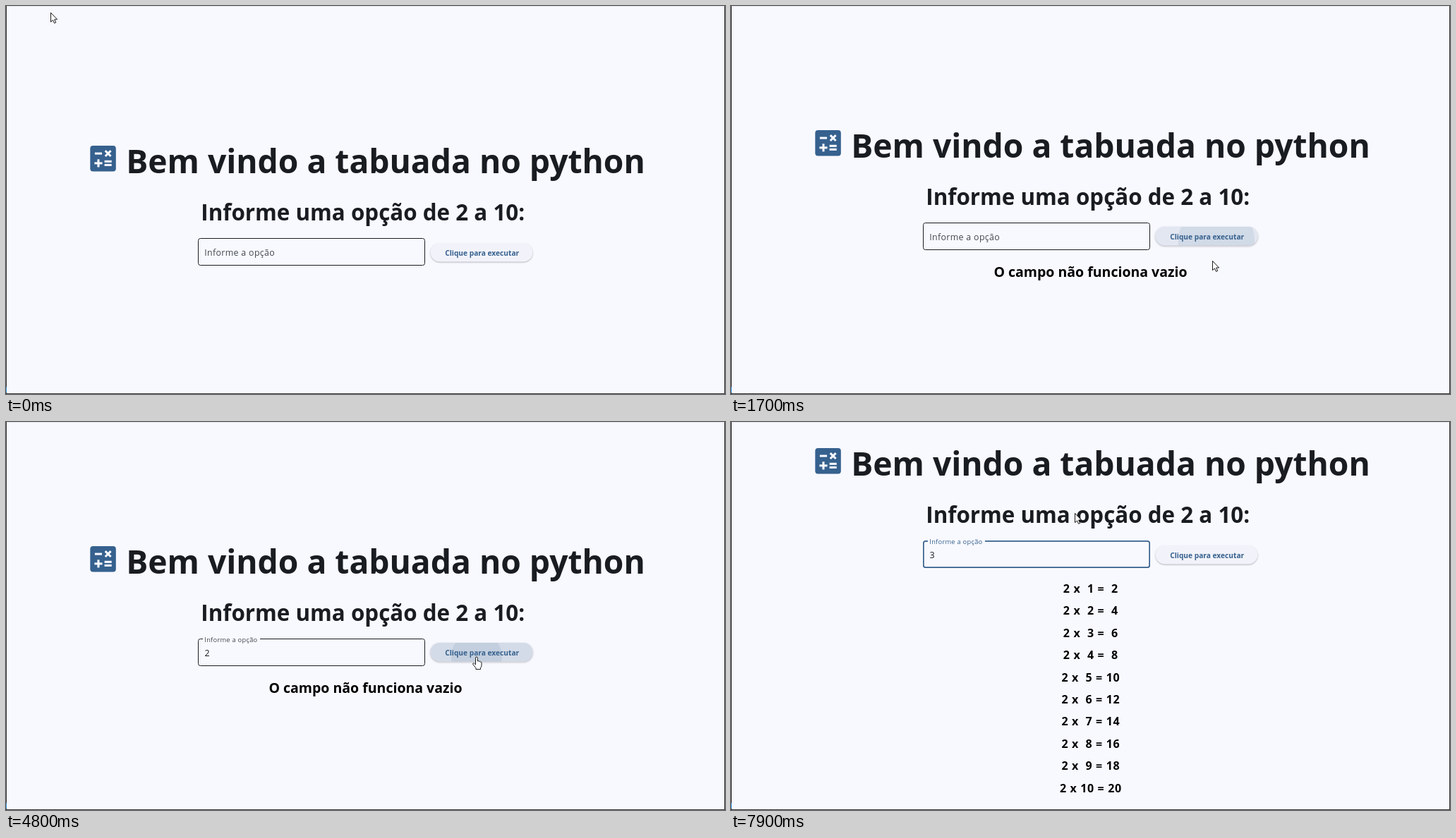
Animation of 1019x550 px, one loop 8000 ms. Source, as an HTML page with a canvas:

```html
<!DOCTYPE html>
<html lang="pt">
<head>
<meta charset="utf-8">
<title>Tabuada</title>
<style>
  html, body { margin: 0; width: 100%; height: 100%; overflow: hidden; background: #f8f9ff; }
  canvas { display: block; width: 1019px; height: 550px; }
</style>
</head>
<body>
<canvas id="stage" width="1019" height="550"></canvas>
<script>
const ctx = document.getElementById('stage').getContext('2d');
const LOOP = 8000, STEP = 100, BLINK = 500;
const BG = '#f8f9ff', INK = '#191c20', MUTED = '#42474e', PRIMARY = '#36618e', EDGE = '#33353c';
const FONT = '"Open Sans", "Noto Sans", sans-serif';
const FIELD = { x: 272, y: 306.5, w: 322, h: 39 };
const BUTTON = { x: 601.5, y: 313, w: 145, h: 26.5 };

// What the visitor does
const PRESSES = [
  { down: 1700, up: 1700, x: 688, y: 333, reach: 54 },
  { down: 4800, up: 5000, x: 667, y: 333, reach: 36 }
];
const HOVERS = [[1500, 2000], [4500, 5000]];
const FOCUSES = [[2700, 4700], [6100, LOOP]];
const EDITS = [[3500, '2'], [6900, ''], [7300, '3']];
const GLIDES = [ // start, end, x, y
  [0, 400, 511, 440], [500, 1100, 735, 345], [1400, 1500, 688, 356],
  [1600, 1700, 682, 361], [2000, 2600, 540, 330], [4400, 4700, 667, 333],
  [5000, 5600, 398, 300], [5700, 5900, 395, 190], [7700, 7900, 487, 129]
];

const clamp = v => Math.max(0, Math.min(1, v));
const mix = (a, b, p) => a + (b - a) * p;
const within = (spans, t) => spans.find(([a, b]) => t >= a && t < b);
const inside = (box, x, y, Y) =>
  x >= box.x && x <= box.x + box.w && y >= Y(box.y) && y <= Y(box.y) + box.h;

function pointerAt(t) {
  let x = 63, y = 9;
  for (const [start, end, toX, toY] of GLIDES) {
    const p = clamp((t - start) / (end - start));
    x = mix(x, toX, p);
    y = mix(y, toY, p);
  }
  return [Math.round(x), Math.round(y)];
}

function text(str, x, y, size, { weight = 700, color = INK, align = 'center', gap = 0 } = {}) {
  ctx.font = `${weight} ${size}px ${FONT}`;
  ctx.letterSpacing = gap + 'px';
  ctx.textAlign = align;
  ctx.fillStyle = color;
  ctx.fillText(str, x, y);
}

function rect(x, y, w, h, color) {
  ctx.fillStyle = color;
  ctx.fillRect(x, y, w, h);
}

function roundRect(x, y, w, h, r) {
  ctx.beginPath();
  ctx.roundRect(x, y, w, h, r);
}

function drawIcon(y) {
  const s = 36.5 / 18;
  ctx.save();
  ctx.translate(119.3, y);
  ctx.scale(s, s);
  ctx.translate(-3, -3);
  ctx.fillStyle = PRIMARY;
  roundRect(3, 3, 18, 18, 2);
  ctx.fill();
  rect(6.25, 7.72, 5, 1.5, BG);
  rect(13, 13.25, 5, 1.5, BG);
  rect(13, 15.75, 5, 1.5, BG);
  rect(6, 14.5, 5.5, 1.5, BG);
  rect(8, 12.5, 1.5, 5.5, BG);
  ctx.strokeStyle = BG;
  ctx.lineWidth = 1.5;
  ctx.beginPath();
  for (const d of [-1.94, 1.94]) {
    ctx.moveTo(15.5 - d, 6.53);
    ctx.lineTo(15.5 + d, 10.41);
  }
  ctx.stroke();
  ctx.restore();
}

function drawField(t, Y) {
  const focus = within(FOCUSES, t);
  const edit = EDITS.filter(e => e[0] <= t).pop() || [0, ''];
  const value = edit[1];
  const rise = 1 - (1 - clamp((t - 2600) / 300)) ** 2;
  const line = focus ? 1.7 : 1;
  const top = Y(FIELD.y);

  ctx.strokeStyle = focus ? PRIMARY : INK;
  ctx.lineWidth = line;
  roundRect(FIELD.x + line / 2, top + line / 2, FIELD.w - line, FIELD.h - line, 3);
  ctx.stroke();
  if (rise > 0) rect(279, top - 1, 81 * rise, 4, BG);

  text('Informe a opção', 281.3, Math.round(mix(Y(331.5), Y(311.5), rise)), mix(12.4, 9.3, rise),
    { weight: 400, color: focus ? PRIMARY : MUTED, align: 'left', gap: mix(0.32, 0.26, rise) });
  text(value, 281.5, Y(331.5), 12.4, { weight: 400, align: 'left' });

  // The caret starts lit again at every focus and edit
  if (focus) {
    const age = t - Math.max(focus[0], edit[0]);
    if (age % (2 * BLINK) < BLINK) rect(value ? 289.2 : 282, Y(316), 1.5, 20, PRIMARY);
  }
}

function drawButton(t, Y) {
  const { x, w, h } = BUTTON, y = Y(BUTTON.y);
  const hover = Math.max(...HOVERS.map(([a, b]) => t < a ? 0 : clamp(1 - (t - b) / 300)));
  const pressed = PRESSES.some(p => t >= p.down && t < p.up);
  const tint = 0.08 * hover + (pressed ? 0.085 : 0);

  ctx.save();
  ctx.shadowColor = 'rgba(0,0,0,0.28)';
  ctx.shadowBlur = 2 + hover;
  ctx.shadowOffsetY = 1;
  ctx.fillStyle = '#f2f3fa';
  roundRect(x, y, w, h, h / 2);
  ctx.fill();
  ctx.restore();

  ctx.save();
  roundRect(x, y, w, h, h / 2);
  ctx.clip();
  rect(x, y, w, h, `rgba(54,97,142,${tint})`);
  for (const p of PRESSES) {
    if (t < p.down) continue;
    const age = Math.max(0, t - p.up);
    ctx.fillStyle = `rgba(54,97,142,${0.1 * clamp(1 - age / 200)})`;
    ctx.beginPath();
    ctx.arc(p.x, Y(p.y), p.reach + age / 4, 0, Math.PI * 2);
    ctx.fill();
  }
  ctx.restore();
  text('Clique para executar', 674.7, Y(331), 10.2, { color: PRIMARY });
}

function drawTable() {
  for (let i = 1; i <= 10; i++) {
    const n = String(i).padStart(2), product = String(2 * i).padStart(2);
    text(`2 x ${n} = ${product}`, 509.8, Math.round(242 + 31.4 * (i - 1)), 16, { color: '#000', gap: 0.65 });
  }
}

const ARROW = new Path2D('M.5 .5V13.6L3.5 10.9L5.6 15.4L7.7 14.4L5.7 10H9.6Z');
const HAND = new Path2D('M-1.5 11V1.3Q-1.5 0 -.1 0Q1.3 0 1.3 1.3V6Q2.4 5.2 3.5 6.3Q4.6 5.8 5.4 7' +
  'Q7 6.8 7 8.6V12Q7 14 5.5 15.5V17.6H-1V15.8L-5.2 10.6Q-5.8 9.2 -4.6 8.8Q-3.6 8.6 -2.8 9.7Z');

function drawPointer(t, Y) {
  const [x, y] = pointerAt(t);
  if (inside(FIELD, x, y, Y)) return;
  const hover = within(HOVERS, t);
  const settled = hover && t - hover[0] >= 200 && inside(BUTTON, x, y, Y);
  const shape = settled ? HAND : ARROW;
  ctx.save();
  ctx.translate(x, y);
  ctx.fillStyle = '#fff';
  ctx.strokeStyle = '#000';
  ctx.lineWidth = 0.9;
  ctx.fill(shape);
  ctx.stroke(shape);
  ctx.restore();
}

function drawEdges() {
  rect(0, 0, 1019, 1, '#e6e7ed');
  rect(0, 0, 1, 550, EDGE);
  rect(1018, 0, 1, 550, EDGE);
  rect(0, 549, 1019, 1, EDGE);
  rect(0, 540, 1, 8, '#2f8fd8');
}

function draw(t) {
  const [first, second] = PRESSES;
  const shift = t >= second.up ? -138.5 : t >= first.up ? 0 : 22.5;
  const Y = y => Math.round(y + shift);
  rect(0, 0, 1019, 550, BG);
  drawIcon(Y(175.5));
  text('Bem vindo a tabuada no python', 538, Y(214.5), 46.2);
  text('Informe uma opção de 2 a 10:', 505.7, Y(281.5), 31.35);
  drawField(t, Y);
  drawButton(t, Y);
  if (t >= second.up) drawTable();
  else if (t >= first.up) text('O campo não funciona vazio', 509.5, 384, 19.5, { color: '#000' });
  drawEdges();
  drawPointer(t, Y);
}

const start = performance.now();
function tick() {
  const t = (performance.now() - start) % LOOP;
  draw(Math.floor(t / STEP) * STEP);
  requestAnimationFrame(tick);
}
tick();
</script>
</body>
</html>
```
